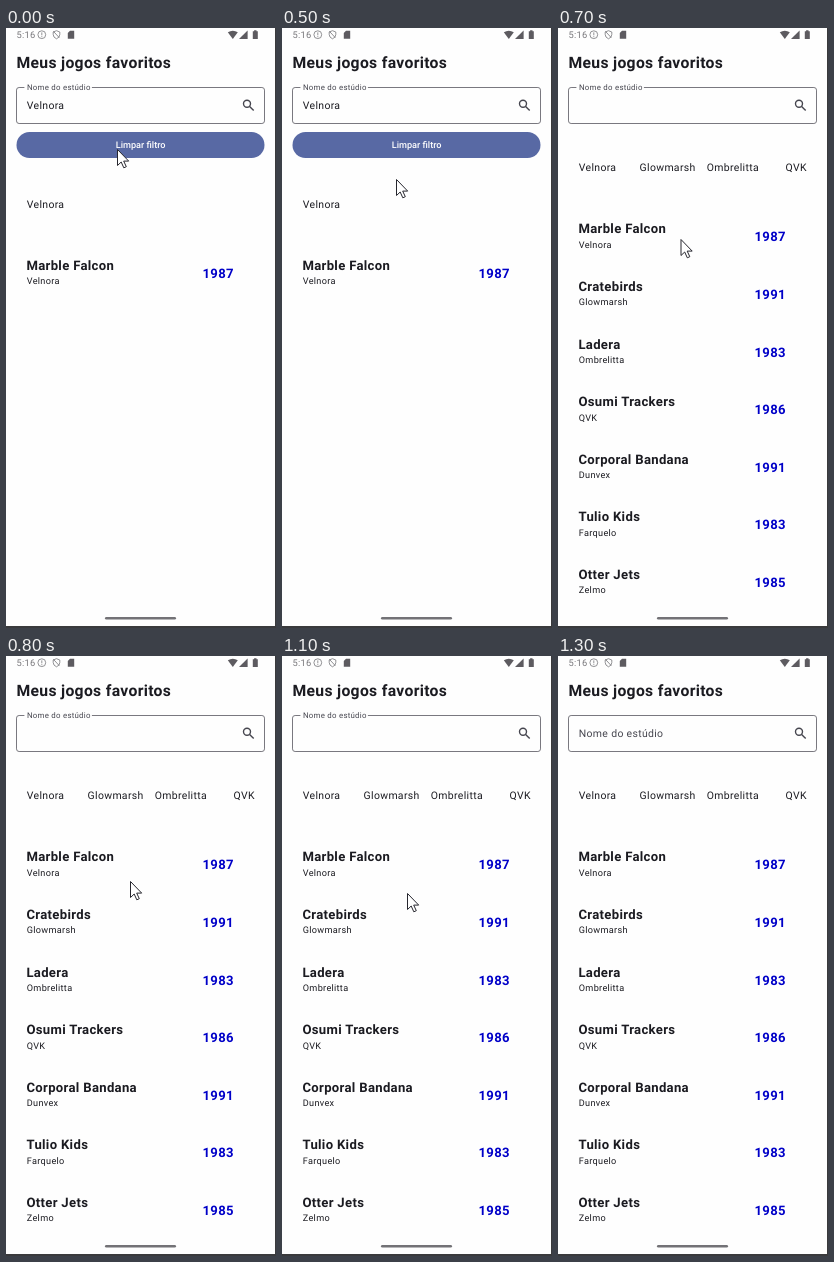
Write an HTML page that moves like this. It is 270 px wide and 600 px high and loops after 2.2 s.

```html
<!DOCTYPE html>
<html lang="pt-BR">
<head>
<meta charset="utf-8">
<title>Meus jogos favoritos</title>
<style>
  html, body { margin: 0; width: 100%; height: 100%; overflow: hidden; background: #fefefe; }
  svg { display: block; width: 270px; height: 600px; }
  text {
    font-family: Roboto, sans-serif; font-size: 10.46px; letter-spacing: .327px;
    fill: #1b1b21; white-space: pre; text-rendering: geometricPrecision;
  }
  .title { font-size: 15.7px; font-weight: 700; }
  .game { font-size: 13.1px; font-weight: 700; }
  .studio { font-size: 9.15px; letter-spacing: .3px; }
  .year { font-size: 13.1px; font-weight: 700; fill: #0000c8; }
  .hint { fill: #46464f; }
  .label { font-size: 7.85px; letter-spacing: .26px; fill: #46464f; }
  .action { font-size: 9.15px; font-weight: 500; letter-spacing: 0; fill: #fff; text-anchor: middle; }
  .clock { font-size: 9.3px; letter-spacing: .2px; fill: #77767a; }
</style>
</head>
<body>
<svg viewBox="0 0 270 600">
  <rect width="270" height="600" fill="#fefefe"/>

  <!-- status bar -->
  <text class="clock" x="10.6" y="10.3">5:16</text>
  <g fill="none" stroke="#77767a" stroke-width=".8">
    <circle cx="35.8" cy="6.7" r="3.9"/>
    <path d="M35.8 4.4v2.9M35.8 8.2v1"/>
    <path d="M50.5 2.7l3.3 1.3v2.5q0 3-3.3 4.3q-3.3-1.3-3.3-4.3v-2.5zM47.4 3.3l5.9 6.4"/>
  </g>
  <g fill="#5d5b60">
    <path d="M64 2.8h4.2v7.9h-6.4v-5.7z"/>
    <path d="M221.8 4.3q5-3.3 10 0l-5 6.7z"/>
    <path d="M241.6 2.4v8.6h-8.6z"/>
    <path d="M246.8 3.3h1.3v-1h2.4v1h1.3v7.7h-5z"/>
  </g>

  <text class="title" x="10.4" y="40">Meus jogos favoritos</text>

  <!-- search field -->
  <rect x="10.5" y="59.5" width="248" height="36" rx="2.6" fill="none" stroke="#79787f"/>
  <g id="floating">
    <rect x="18.4" y="57" width="67.5" height="5" fill="#fefefe"/>
    <text class="label" x="21" y="61.6">Nome do estúdio</text>
  </g>
  <text id="hint" class="hint" x="20.8" y="81.3">Nome do estúdio</text>
  <text id="query" x="20.8" y="81.3"></text>
  <g fill="none" stroke="#46464f" stroke-width="1.4">
    <circle cx="241" cy="75.8" r="3.5"/>
    <path d="M243.6 78.4l4.1 4.1"/>
  </g>

  <g id="clear">
    <rect x="10.5" y="104" width="248" height="26" rx="13" fill="#5869a4"/>
    <text class="action" x="134.6" y="120.3">Limpar filtro</text>
  </g>

  <g id="filtered"></g>
  <g id="full"></g>

  <rect x="99" y="589" width="71" height="2.4" rx="1.2" fill="#737276"/>
  <rect x="269" width="1" height="600" fill="#3a3a3c"/>
  <rect y="598" width="270" height="2" fill="#3a3a3c"/>

  <path id="cursor" d="M.5 .5v16l3.7-3.5l2.6 5.8l2.5-1.1l-2.6-5.6h5z"
        fill="#fff" stroke="#26262e" stroke-linejoin="round"/>
</svg>
<script>
const LOOP = 2200, STEP = 100, ROW = 57.6, FILTER_SHIFT = 36.6;
const CLEARED = 700, BLURRED = 1200, POINTER_GONE = 1300;

const games = [
  ['Marble Falcon', 'Velnora', 1987],
  ['Cratebirds', 'Glowmarsh', 1991],
  ['Ladera', 'Ombrelitta', 1983],
  ['Osumi Trackers', 'QVK', 1986],
  ['Corporal Bandana', 'Dunvex', 1991],
  ['Tulio Kids', 'Farquelo', 1983],
  ['Otter Jets', 'Zelmo', 1985]
];
const chipX = [20.8, 81.6, 148.8, 227.6];

// Pointer tip for each step of STEP ms
const trail = [
  [111, 121], [111, 121], [111, 121], [111, 121], [112, 128], [114, 151], [116, 183],
  [122.5, 211], [124, 225], [125, 232], [125, 236], [125, 237], [69, 236]
];

const el = id => document.getElementById(id);
const show = (id, on) => { el(id).style.display = on ? '' : 'none'; };

function addText(parent, x, y, text, cls = '') {
  const node = document.createElementNS('http://www.w3.org/2000/svg', 'text');
  node.setAttribute('x', x);
  node.setAttribute('y', y);
  node.setAttribute('class', cls);
  node.textContent = text;
  parent.append(node);
}

function buildList(id, items, shift) {
  const group = el(id);
  group.setAttribute('transform', `translate(0 ${shift})`);
  items.forEach(([name, studio, year], i) => {
    const y = i * ROW;
    if (i < chipX.length) addText(group, chipX[i], 143, studio);
    addText(group, 20.4, 205.4 + y, name, 'game');
    addText(group, 20.8, 219.8 + y, studio, 'studio');
    addText(group, 196.5, 213.4 + y, year, 'year');
  });
}

function draw(t) {
  const filtered = t < CLEARED;
  const floating = t < BLURRED;
  show('filtered', filtered);
  show('clear', filtered);
  show('query', filtered);
  show('full', !filtered);
  show('floating', floating);
  show('hint', !floating);
  show('cursor', t < POINTER_GONE);
  const [x, y] = trail[Math.min(Math.floor(t / STEP), trail.length - 1)];
  el('cursor').setAttribute('transform', `translate(${x} ${y})`);
}

function tick() {
  draw(performance.now() % LOOP);
  requestAnimationFrame(tick);
}

el('query').textContent = games[0][1];
buildList('filtered', games.slice(0, 1), FILTER_SHIFT);
buildList('full', games, 0);
tick();
</script>
</body>
</html>
```
